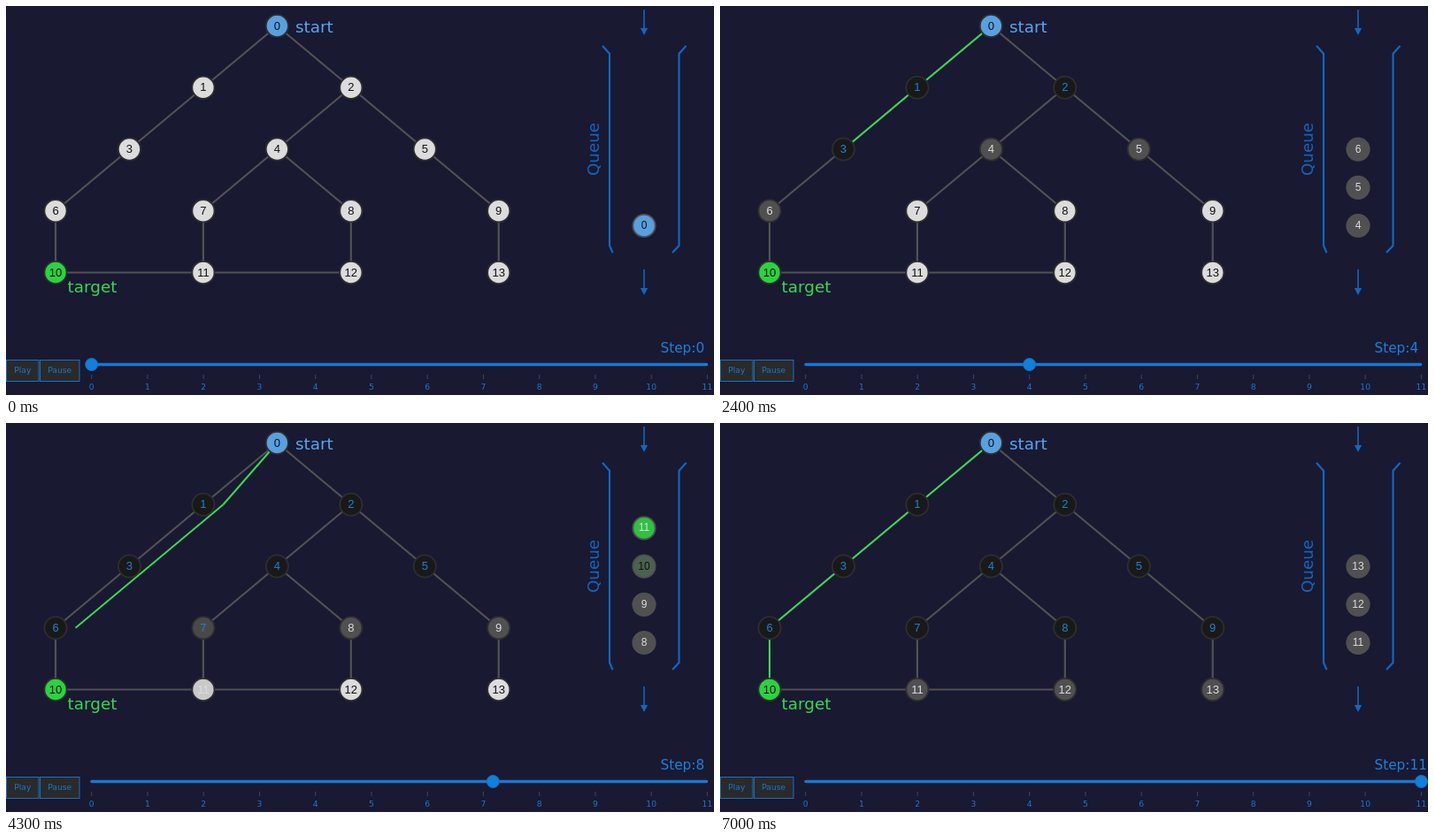
Recreate the animation shown at these times as an HTML page with a canvas. Size 800 by 440 pixels, loop 7100 ms.

```html
<!DOCTYPE html>
<html lang="en">
<head>
<meta charset="utf-8">
<title>Breadth-first search</title>
<style>
  html, body { margin: 0; width: 100%; height: 100%; overflow: hidden; background: #191932; }
  canvas { display: block; }
</style>
</head>
<body>
<canvas id="stage" width="800" height="440"></canvas>
<script>
const ctx = document.getElementById('stage').getContext('2d');

const LOOP = 7100, TICK = 100;
const FIRST = 51, PERIOD = 519, DURATION = 300, SLIDER_LEAD = 8;
const LAST_STEP = 11, START = 0, TARGET = 10;

const SANS = '"DejaVu Sans", Verdana, sans-serif';
const ARIAL = '"Liberation Sans", Arial, sans-serif';
const BLUE = '#1878d0', DEEP_BLUE = '#1166c0', GREEN = '#38da50';
const FILL = {
  start: [88, 160, 224], target: [43, 210, 64],
  fresh: [220, 220, 220], queued: [80, 80, 80], done: [25, 25, 25]
};
const INK = { start: '#111', target: '#111', fresh: '#111', queued: '#dcdcdc', done: '#1e80d8' };

// Node columns and rows on the drawing grid
const nodes = [[3, 0], [2, 1], [4, 1], [1, 2], [3, 2], [5, 2], [0, 3], [2, 3], [4, 3], [6, 3],
  [0, 4], [2, 4], [4, 4], [6, 4]].map(([c, r]) => [56 + c * 83.45, 22.5 + r * 69.75]);
const edges = [[0, 1], [0, 2], [1, 3], [2, 4], [2, 5], [3, 6], [4, 7], [4, 8], [5, 9],
  [6, 10], [7, 11], [8, 12], [9, 13], [10, 11], [11, 12]];

const special = id => id === START ? 'start' : id === TARGET ? 'target' : null;

// One state per search step: node status, queue and path segments back to the root
function search() {
  const parent = {}, status = nodes.map((_, id) => special(id) || 'fresh');
  const seen = new Set([START]);
  let queue = [START];
  const states = [{ status: [...status], queue, path: [] }];
  while (states.length <= LAST_STEP) {
    const current = queue[0];
    queue = queue.slice(1);
    if (!special(current)) status[current] = 'done';
    if (current !== TARGET) for (const [a, b] of edges) {
      if (a !== current || seen.has(b)) continue;
      seen.add(b);
      parent[b] = a;
      queue.push(b);
      if (!special(b)) status[b] = 'queued';
    }
    const path = [];
    for (let id = current; id in parent; id = parent[id]) {
      path.push([...nodes[id], ...nodes[parent[id]]]);
    }
    states.push({ status: [...status], queue, path });
  }
  return states;
}
const states = search();

const clamp = v => Math.min(1, Math.max(0, v));
const cubicInOut = t => t < .5 ? 4 * t ** 3 : 1 - 4 * (1 - t) ** 3;
const mix = (a, b, t) => a.map((v, i) => v + (b[i] - v) * t);
const rgb = c => `rgb(${c.map(Math.round)})`;

function line(points, color, width) {
  ctx.strokeStyle = color;
  ctx.lineWidth = width;
  ctx.beginPath();
  points.forEach(p => ctx.lineTo(...p));
  ctx.stroke();
}

function circle(x, y, r, fill, stroke, width) {
  ctx.beginPath();
  ctx.arc(x, y, r, 0, Math.PI * 2);
  ctx.fillStyle = fill;
  ctx.fill();
  ctx.strokeStyle = stroke;
  ctx.lineWidth = width;
  ctx.stroke();
}

function text(str, x, y, size, color, align = 'center', family = SANS) {
  ctx.font = `${size}px ${family}`;
  ctx.textAlign = align;
  ctx.fillStyle = color;
  ctx.fillText(str, x, y);
}

function faded(alpha, draw) {
  ctx.globalAlpha = alpha;
  draw();
  ctx.globalAlpha = 1;
}

// Pairs items by index: both present means move, otherwise fade in or out
function blend(before, after, t, draw) {
  for (let i = 0; i < Math.max(before.length, after.length); i++) {
    const a = before[i], b = after[i];
    const alpha = a === undefined ? t : b === undefined ? 1 - t : 1;
    faded(alpha, () => draw(a ?? b, b ?? a, i));
  }
}

function drawGraph(from, to, t) {
  for (const [a, b] of edges) line([nodes[a], nodes[b]], '#525252', 2.2);
  blend(from.path, to.path, t, (a, b) => {
    const [x1, y1, x2, y2] = mix(a, b, t);
    line([[x1, y1], [x2, y2]], GREEN, 2);
  });
  nodes.forEach(([x, y], id) => {
    const status = to.status[id];
    circle(x, y, 12.6, rgb(mix(FILL[from.status[id]], FILL[status], t)), '#2e2e2e', 1.8);
    text(id, x, y + 4, 13, INK[status], 'center', ARIAL);
  });
  text('start', 327, 30, 18.4, '#58a6ee', 'left');
  text('target', 69.5, 324, 18.4, '#36d850', 'left');
}

function drawArrow(y) {
  line([[721, y], [721, y + 23]], DEEP_BLUE, 1.6);
  ctx.fillStyle = DEEP_BLUE;
  ctx.beginPath();
  ctx.moveTo(716.8, y + 21);
  ctx.lineTo(725.2, y + 21);
  ctx.lineTo(721, y + 29);
  ctx.fill();
}

function drawQueue(from, to, t) {
  line([[674, 45], [682, 54], [682, 271], [685.5, 279]], DEEP_BLUE, 2.2);
  line([[768.5, 45], [760.5, 54], [760.5, 271], [753, 279]], DEEP_BLUE, 2.2);
  drawArrow(4);
  drawArrow(298);

  ctx.save();
  ctx.translate(670, 162);
  ctx.rotate(-Math.PI / 2);
  text('Queue', 0, 0, 18.3, DEEP_BLUE);
  ctx.restore();

  const slotY = i => 248.5 - i * 43.2;
  const kind = id => special(id) || 'queued';
  blend(from.queue, to.queue, t, (a, b, i) => {
    circle(721, slotY(i), 12.7, rgb(mix(FILL[kind(a)], FILL[kind(b)], t)), '#505050', 1.8);
  });
  to.queue.forEach((id, i) => text(id, 721, slotY(i) + 3.5, 12, INK[kind(id)], 'center', ARIAL));
}

function drawButton(label, x, width) {
  ctx.fillStyle = '#2a2a2a';
  ctx.fillRect(x, 400.5, width, 24);
  ctx.strokeStyle = '#1472c4';
  ctx.lineWidth = 1;
  ctx.strokeRect(x, 400.5, width, 24);
  text(label, x + width / 2, 415, 9.2, BLUE);
}

function drawControls(step, value) {
  const tickX = v => 96.7 + v * 63.25;
  drawButton('Play', .5, 36.5);
  drawButton('Pause', 38.5, 44.5);
  ctx.lineCap = 'round';
  line([[97, 405.5], [791.5, 405.5]], BLUE, 3.6);
  ctx.lineCap = 'butt';
  for (let i = 0; i <= LAST_STEP; i++) {
    line([[tickX(i), 417], [tickX(i), 422]], '#444450', 1);
    text(i, tickX(i), 433.5, 9.2, BLUE);
  }
  circle(tickX(value), 405.5, 7, '#1080dc', '#1570c0', 1);
  text('Step:' + step, 739.5, 391.5, 15.3, '#1c80da', 'left');
}

function render(time) {
  const step = Math.min(LAST_STEP, Math.max(0, Math.floor((time - FIRST) / PERIOD)));
  const elapsed = time - FIRST - step * PERIOD;
  const progress = ms => cubicInOut(clamp(ms / DURATION));
  const previous = Math.max(0, step - 1);
  const from = states[previous], to = states[step], t = progress(elapsed);

  ctx.fillStyle = '#191932';
  ctx.fillRect(0, 0, 800, 440);
  drawGraph(from, to, t);
  drawQueue(from, to, t);
  drawControls(step, previous + (step - previous) * progress(elapsed + SLIDER_LEAD));
}

function loop() {
  const time = performance.now() % LOOP;
  render(Math.floor(time / TICK) * TICK);
  requestAnimationFrame(loop);
}
loop();
</script>
</body>
</html>
```
